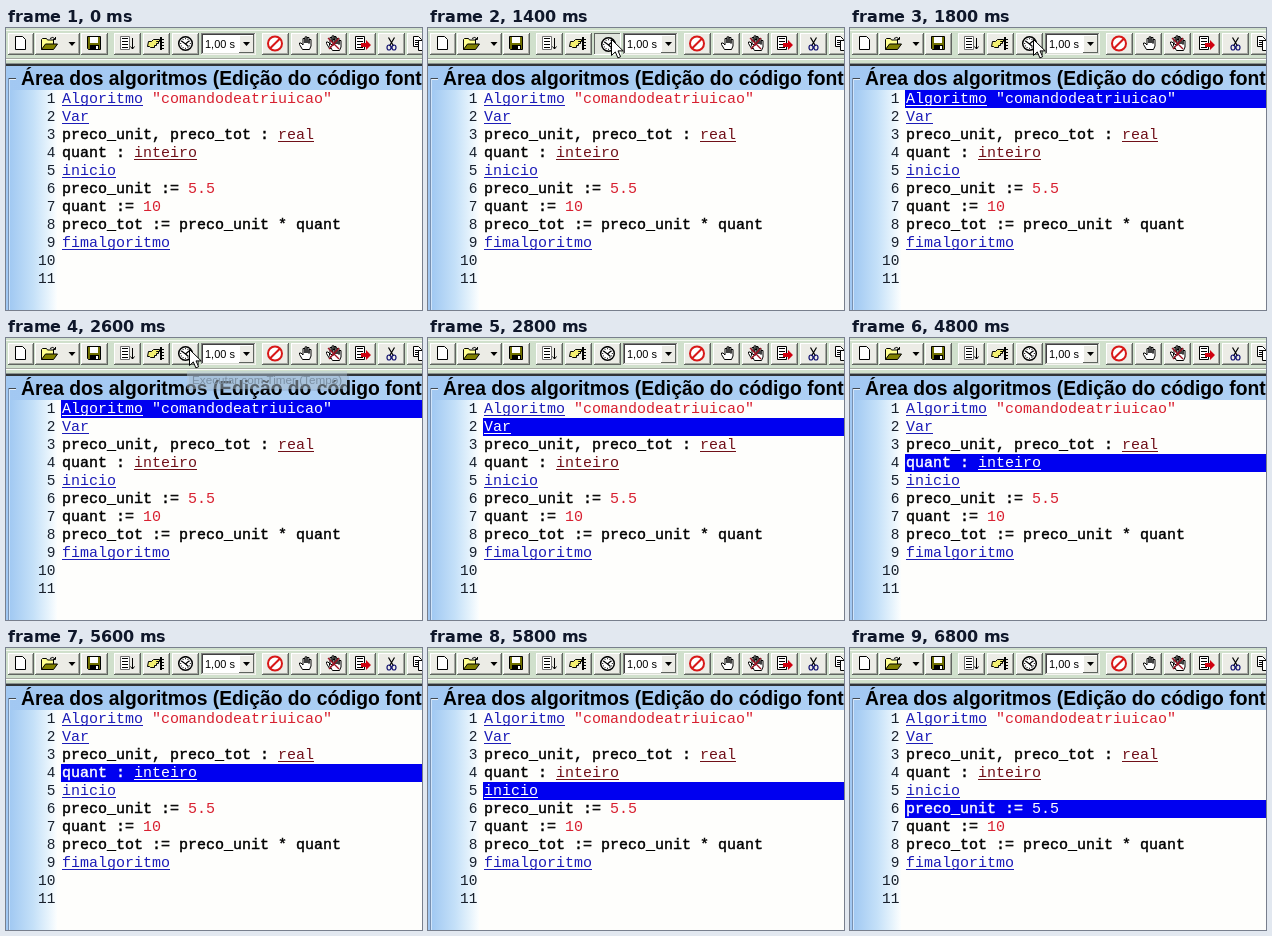
An HTML page that plays this animation: 416x282 px, repeating every 8 s.

```html
<!DOCTYPE html>
<html lang="pt">
<head>
<meta charset="utf-8">
<title>Execução passo a passo</title>
<style>
  html, body { margin: 0; width: 100%; height: 100%; overflow: hidden; background: #fff; }
  svg { display: block; width: 416px; height: 282px; }
  text { white-space: pre; }
  .code { font: 15px "Liberation Mono", "Courier New", monospace; }
  .plain { fill: #000; stroke: #000; stroke-width: .45px; }
  .key { fill: #1c1cb8; }
  .type { fill: #701018; }
  .value { fill: #d82030; }
  .active * { fill: #fff; }
  .active .plain { stroke: #fff; }
  .num { font-size: 14.5px; fill: #18202c; text-anchor: end; }
  .title { font: bold 19.3px "Liberation Sans", Arial, sans-serif; }
  .small { font: 11px "Liberation Sans", Arial, sans-serif; }
</style>
</head>
<body>
<svg id="stage" viewBox="0 0 416 282" xmlns="http://www.w3.org/2000/svg"></svg>
<script>
const LOOP = 8000;
const LINE_H = 18, CODE_TOP = 62, CODE_X = 56, CHAR_W = 9;
const BAR = "#d0e0cc", FACE = "#ecece6", SHADE = "#a4a8a0";

const program = [
  [["key", "Algoritmo"], ["plain", " "], ["value", '"comandodeatriuicao"']],
  [["key", "Var"]],
  [["plain", "preco_unit, preco_tot : "], ["type", "real"]],
  [["plain", "quant : "], ["type", "inteiro"]],
  [["key", "inicio"]],
  [["plain", "preco_unit := "], ["value", "5.5"]],
  [["plain", "quant := "], ["value", "10"]],
  [["plain", "preco_tot := preco_unit * quant"]],
  [["key", "fimalgoritmo"]],
  [], []
];

const rect = (x, y, w, h, fill, more = "") =>
  `<rect x="${x}" y="${y}" width="${w}" height="${h}" fill="${fill}" ${more}/>`;
const path = (d, fill = "none", stroke = "#000", width = 1) =>
  `<path d="${d}" fill="${fill}" stroke="${stroke}" stroke-width="${width}"/>`;
const at = (x, y, body) => `<g transform="translate(${x} ${y})">${body}</g>`;

// Two-tone border of a raised or sunken control
function bevel(x, y, w, h, light, dark) {
  return rect(x, y, w, 1, light) + rect(x, y, 1, h, light) +
    rect(x, y + h - 1, w, 1, dark) + rect(x + w - 1, y, 1, h, dark);
}

function button(x, w) {
  return rect(x, 5, w, 22, FACE) + bevel(x, 5, w, 22, "#fff", "#606460") +
    bevel(x + 1, 6, w - 2, 20, FACE, SHADE);
}

const arrowDown = (x, y) => path(`M${x} ${y}h7l-3.5 4z`, "#000", "none");
const page = (w, h) => path(`M.5 .5h${w - 4}l3 3v${h - 4}h${1 - w}z`, "#fff");
const rows = (x, y, w, n, gap = 3) => path(
  Array.from({ length: n }, (_, i) => `M${x} ${y + i * gap + .5}h${w}`).join(""));

const openHand = fill => path(
  "M3.5 13.5L.5 8.5V7h1.5l2 2V2.5h2V7V.9h2V7V1.5h2V7.5V3.5h2V10l-1.5 3.5z", fill);

const pointer = path("M.5 .5V16.5l3.8-3.6 2.6 6 2.7-1.2-2.6-5.8h5.2z", "#fff");

const clock = (() => {
  let dots = "";
  for (let i = 0; i < 12; i++) {
    const a = i * Math.PI / 6;
    dots += rect(Math.cos(a) * 4.8 - .5, Math.sin(a) * 4.8 - .5, 1, 1, "#000");
  }
  return `<circle r="6.8" fill="#fff" stroke="#000" stroke-width="1.5"/>` + dots +
    path("M-4 -2.5L0 .5L3.5 -2.5M0 .5L3 3", "none", "#000", 1.3);
})();

const icons = {
  blank: page(11, 14),
  open: path("M.5 12.5V2.5l1-1h4l1 1.5h6v4", "#ffff90") +
    path("M.5 12.5l4-5.5h12l-4 5.5z", "#808000") +
    path("M9 1.5q3-2.5 5 .5m.5-2v2.5h-2.5"),
  save: path("M.5 .5h13v13h-12l-1-1z", "#707000") +
    rect(3, 1, 8, 6, "#fff") + rect(3, 9, 9, 5, "#000") + rect(9, 10, 2, 3, "#fff"),
  steps: path("M.5 .5h9v13h-9z", "#fff", "#707070") + rows(2, 2, 6, 4) +
    path("M12.5 2v11m-2-2.5l2 2.5l2-2.5"),
  point: path("M.5 5.5h3l2-2h6v2h-3h2v2h-2v2h-2v2h-4l-1-1h-2z", "#f4f070") +
    path("M13 1v13", "none", "#000", 2) + rows(12, 3, 4, 4),
  stop: `<circle r="7" fill="#fff" stroke="#d81818" stroke-width="2"/>` +
    path("M-4.8 4.8L4.8 -4.8", "none", "#d81818", 2),
  hands: at(0, -1, openHand("#fff")) + at(3, 1, openHand("#fff")) +
    path("M2 2l11 11M13 2L3 13", "none", "#a01020", 1.3),
  jump: path("M.5 .5h9v13h-9z", "#fff") + rows(2, 2, 6, 4) +
    path("M6 7h5V4l5 5-5 5v-3H6z", "#d00010", "none"),
  cut: path("M2.5 .5L7.5 9M8.5 .5L3.5 9", "none", "#000", 1.2) +
    path("M1 10.5a2 2.5 0 1 0 4 0a2 2.5 0 1 0-4 0M6 10.5a2 2.5 0 1 0 4 0a2 2.5 0 1 0-4 0",
      "none", "#101070", 1.2),
  copy: page(9, 11) + rows(2, 4, 4, 3, 2) + at(5, 4, page(9, 11))
};

function toolbar() {
  const boxes = [[2, 26], [29, 45], [75, 27], [108, 27], [137, 27], [166, 27],
    [256, 27], [285, 27], [314, 27], [343, 27], [372, 27], [401, 27]];
  const placed = [["blank", 9, 8], ["open", 35, 9], ["save", 81, 8], ["steps", 114, 8],
    ["point", 142, 8], ["stop", 269, 15.5], ["hands", 320, 8],
    ["jump", 349, 8], ["cut", 380, 9], ["copy", 407, 8]];
  return rect(0, 0, 416, 36, BAR) + rect(0, 2, 416, 1, "#f4f8f2") +
    rect(0, 30, 416, 1, SHADE) + rect(0, 31, 416, 1, "#fff") +
    rect(0, 35, 416, 1, "#8c9490") + rect(0, 36, 416, 2, "#303438") +
    boxes.map(b => button(...b)).join("") +
    placed.map(([name, x, y]) => at(x, y, icons[name])).join("") +
    at(293, 8, openHand("#fff")) + arrowDown(62.5, 14) +
    rect(195, 5, 55, 22, "#fff") + bevel(195, 5, 55, 22, "#808080", "#f4f4f0") +
    bevel(196, 6, 53, 20, "#404040", "#d8dcd4") +
    rect(233, 7, 15, 18, FACE) + bevel(233, 7, 15, 18, "#fff", "#606460") +
    arrowDown(237, 14) +
    `<text class="small" x="199" y="20">1,00 s</text>`;
}

function codeLine(tokens, base) {
  let col = 0, underlines = "", spans = "";
  for (const [kind, word] of tokens) {
    spans += `<tspan class="${kind}">${word}</tspan>`;
    if (kind === "key" || kind === "type") {
      underlines += rect(CODE_X + col * CHAR_W, base + 2, word.length * CHAR_W, 1, "",
        `class="${kind}"`);
    }
    col += word.length;
  }
  return `<g class="line"><text class="code" x="${CODE_X}" y="${base}">${spans}</text>${underlines}</g>`;
}

function editor() {
  const lines = program.map((tokens, i) => {
    const base = CODE_TOP + i * LINE_H + 13;
    return `<text class="code num" x="49.5" y="${base}">${i + 1}</text>` + codeLine(tokens, base);
  }).join("");
  return rect(0, 38, 416, 244, "url(#panel)") +
    rect(50, CODE_TOP, 366, 220, "#fefefc") + rect(3, CODE_TOP, 48, 220, "url(#gutter)") +
    rect(2, 50, 8, 1, "#404850") + rect(2, 50, 1, 232, "#7890b0") +
    rect(3, 51, 7, 1, "#e8f2fc") + rect(3, 51, 1, 231, "#d0e4fa") +
    `<text class="title" x="15" y="57">Área dos algoritmos (Edição do código fonte)</text>` +
    `<rect id="bar" x="55" width="361" height="${LINE_H}" fill="#0000f0"/>` + lines;
}

const stage = document.getElementById("stage");
stage.innerHTML = `<defs>
    <linearGradient id="panel"><stop stop-color="#a2c8f2"/><stop offset="1" stop-color="#aed0f4"/></linearGradient>
    <linearGradient id="gutter"><stop stop-color="#a0c8f2"/><stop offset=".5" stop-color="#c4e0f8"/>
      <stop offset=".8" stop-color="#e4f2fc"/><stop offset="1" stop-color="#fcfefe"/></linearGradient>
  </defs>` + toolbar() + editor() +
  `<g id="pressed">${rect(166, 5, 27, 22, "#e2e6de")}${bevel(166, 5, 27, 22, "#606460", "#fff")}</g>
  <g id="clock">${clock}</g>
  <g id="tip">${rect(183, 35, 160, 18, "#606870", 'opacity=".15"')}
    ${rect(181, 33, 160, 18, "#b4c8d8", 'opacity=".45"')}
    <text class="small" x="186" y="46" fill="#7c90a4" style="font-size:11.7px">Executar com Timer (Tempo)</text></g>
  <g id="pointer">${pointer}</g>`;

const part = id => document.getElementById(id);
const [bar, pressed, timer, tip, mouse] = ["bar", "pressed", "clock", "tip", "pointer"].map(part);
const codeLines = [...stage.querySelectorAll(".line")];
const show = (el, on) => el.setAttribute("visibility", on ? "visible" : "hidden");
const move = (el, x, y) => el.setAttribute("transform", `translate(${x} ${y})`);
const within = (t, a, b) => t >= a && t < b;

// The first line lights up on release, then one more each second
function activeLine(t) {
  if (t < 1600) return -1;
  return t < 2800 ? 0 : Math.floor((t - 1800) / 1000);
}

function draw(t) {
  const row = activeLine(t);
  show(bar, row >= 0);
  bar.setAttribute("y", CODE_TOP + Math.max(row, 0) * LINE_H);
  codeLines.forEach((el, i) => el.classList.toggle("active", i === row));

  const down = within(t, 1400, 1600);
  show(pressed, down);
  move(timer, down ? 180.5 : 179.5, down ? 16.5 : 15.5);
  show(tip, within(t, 2600, 2800));
  show(mouse, within(t, 200, 2800));
  if (t < 400) move(mouse, 302, 156);
  else move(mouse, 183, 11);
}

const start = performance.now();
function frame() {
  draw((performance.now() - start) % LOOP);
  requestAnimationFrame(frame);
}
draw(0);
requestAnimationFrame(frame);
</script>
</body>
</html>
```
